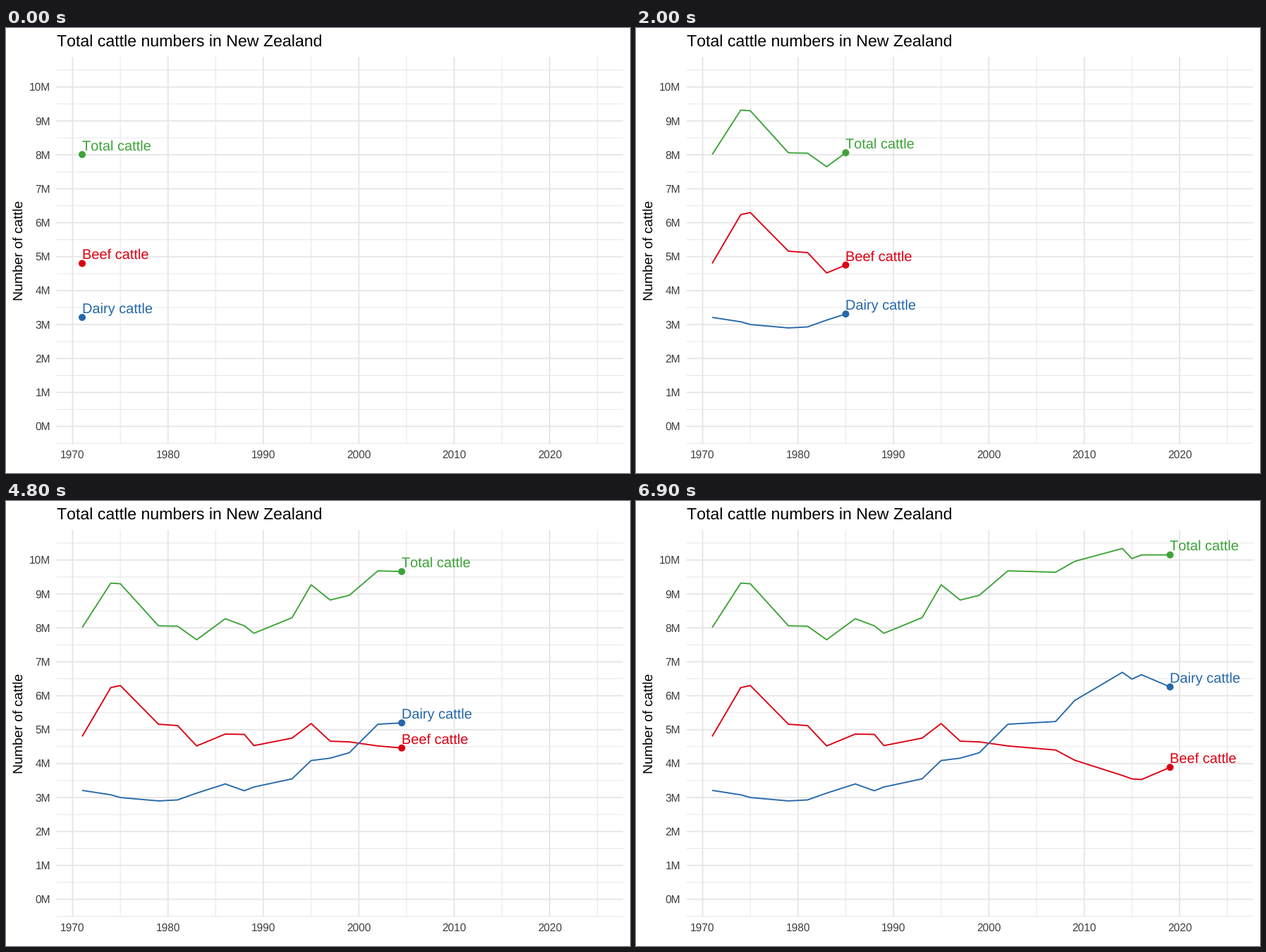
Recreate the animation shown at these times as a matplotlib script. Size 885x632 px, loop 10 s.

```python
import numpy as np
import matplotlib.pyplot as plt
from matplotlib.animation import FuncAnimation
from matplotlib.patches import Circle

W, H, DPI = 885, 632, 64
PT = 72 / DPI                    # points per pixel
FRAMES, LAST = 100, 69           # the chart is complete at LAST, then holds

plt.rcParams.update({
    "font.family": "Liberation Sans",
    "text.hinting": "none",
    "text.kerning_factor": 6,    # unkerned text
})

# Turning points: year, beef and dairy cattle in millions.
TURNS = np.array([
    (1971, 4.80, 3.21), (1974, 6.24, 3.08), (1975, 6.30, 3.00),
    (1979, 5.16, 2.90), (1981, 5.12, 2.93), (1983, 4.52, 3.13),
    (1986, 4.87, 3.40), (1988, 4.86, 3.20), (1989, 4.53, 3.31),
    (1993, 4.75, 3.55), (1995, 5.18, 4.09), (1997, 4.66, 4.16),
    (1999, 4.64, 4.32), (2002, 4.52, 5.16), (2007, 4.40, 5.24),
    (2009, 4.10, 5.86), (2014, 3.65, 6.69), (2015, 3.55, 6.49),
    (2016, 3.53, 6.62), (2019, 3.89, 6.26)])

YEARS = np.arange(1971, 2020)
BEEF, DAIRY = (np.interp(YEARS, TURNS[:, 0], TURNS[:, i]) for i in (1, 2))

# Each year is reached on a whole frame; frames between are interpolated.
KEYS = np.round(np.arange(len(YEARS)) * LAST / (len(YEARS) - 1))

SERIES = [
    ("Beef cattle", BEEF, "#db0012"),
    ("Dairy cattle", DAIRY, "#2668aa"),
    ("Total cattle", BEEF + DAIRY, "#3da338"),
]

LEFT, RIGHT, TOP, BOTTOM = 71.5, 875.2, 41, 590.6
GRID, TICK = "#e6e6e6", "#3e3e3e"


def px(year):
    return 94.5 + (year - 1970) * 13.53


def py(millions):
    return 565.7 - millions * 48.19


fig = plt.figure(figsize=(W / DPI, H / DPI), dpi=DPI, facecolor="white")
ax = fig.add_axes([0, 0, 1, 1])
ax.set_xlim(0, W)
ax.set_ylim(H, 0)
ax.axis("off")


def segment(xs, ys, width, color=GRID, z=1):
    line, = ax.plot(xs, ys, color=color, lw=width * PT, zorder=z, snap=False,
                    solid_capstyle="butt", solid_joinstyle="round")
    return line


def label(x, y, text, size, color, **kw):
    return ax.text(x, y, text, fontsize=size * PT, color=color,
                   va="baseline", **kw)


def draw_grid():
    for year in range(1970, 2026, 5):
        major = year % 10 == 0
        segment([px(year)] * 2, [TOP, BOTTOM], 1.88 if major else 0.94,
                z=1.1 if major else 1)
        if major:
            label(px(year), 610.5, str(year), 15.5, TICK, ha="center")
    for half in range(-1, 22):
        major = half % 2 == 0
        y = py(half / 2)
        segment([LEFT, RIGHT], [y, y], 1.88 if major else 0.94,
                z=1.1 if major else 1)
        if major:
            label(63, y + 5.5, f"{half // 2}M", 15.5, TICK, ha="right")


draw_grid()
label(LEFT, 26, "Total cattle numbers in New Zealand", 23.12, "black")
label(23.6, (TOP + BOTTOM) / 2, "Number of cattle", 19.4, "black",
      ha="center", rotation=90, rotation_mode="anchor")

artists = []
for name, values, color in SERIES:
    trail = segment([], [], 1.88, color, z=3)
    dot = ax.add_patch(Circle((0, 0), 5, color=color, lw=0, zorder=4))
    tag = label(0, 0, name, 20.03, color, zorder=5)
    artists.append((values, trail, dot, tag))


def update(frame):
    t = min(frame, LAST)
    past = KEYS < t
    year = np.interp(t, KEYS, YEARS)
    x = px(year)
    for values, trail, dot, tag in artists:
        now = np.interp(t, KEYS, values)
        y = py(now)
        trail.set_data(px(np.append(YEARS[past], year)),
                       py(np.append(values[past], now)))
        dot.set_center((x, y))
        tag.set_position((x, y - 6.3))
    return [a for group in artists for a in group[1:]]


anim = FuncAnimation(fig, update, frames=FRAMES, interval=100,
                     repeat=True, repeat_delay=0, blit=False)
plt.show()
```
